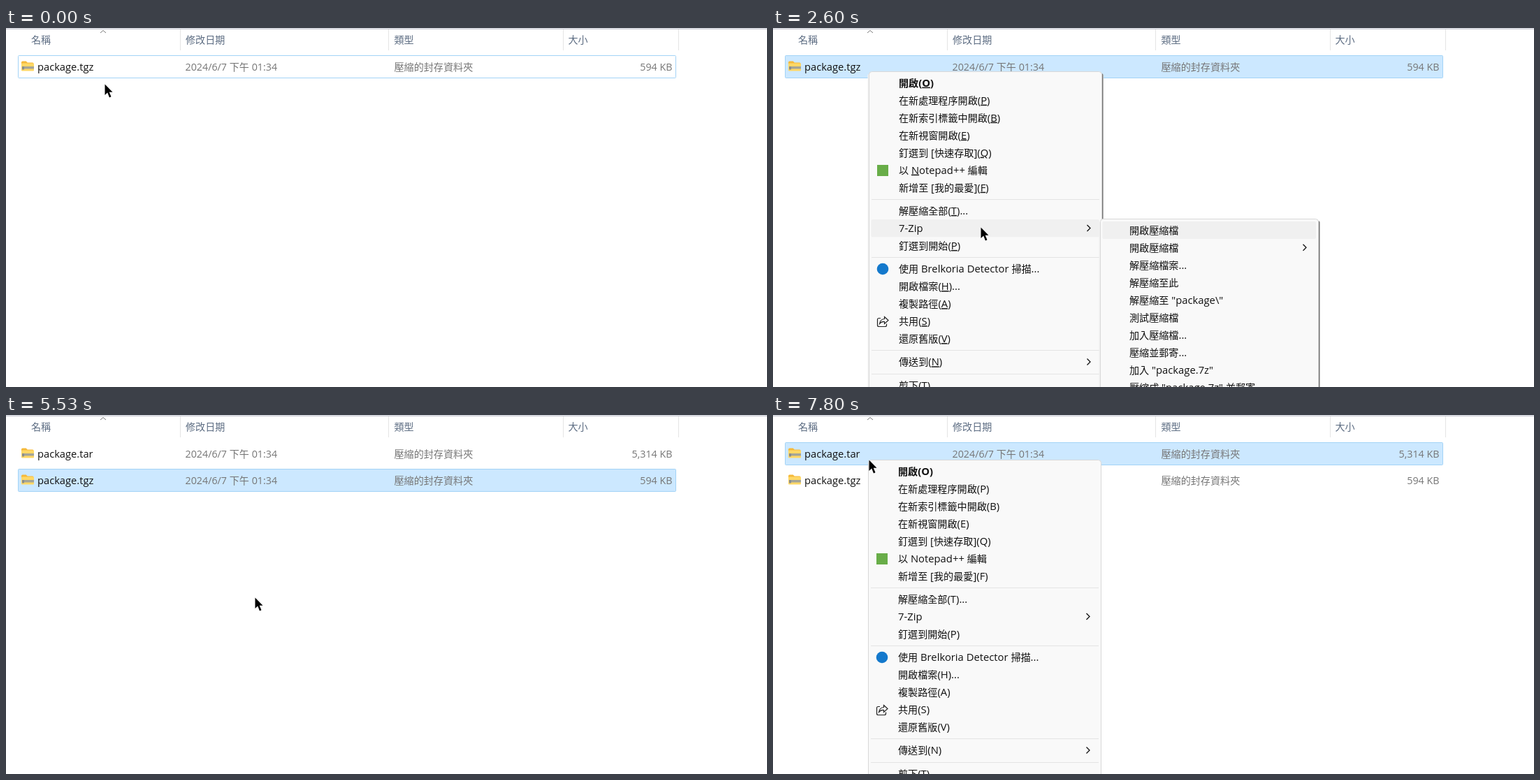
Recreate the animation shown at these times as an HTML page. Size 1089 by 514 pixels, loop 8000 ms.

```html
<!DOCTYPE html>
<html lang="zh-Hant">
<head>
<meta charset="utf-8">
<title>Archive extraction</title>
<style>
  html, body { margin: 0; width: 100%; height: 100%; overflow: hidden; background: #fff; }
  svg { display: block; width: 100vw; height: 100vh; }
  text { font-family: "Open Sans", "Noto Sans", sans-serif; }
  .cjk { font-family: "Noto Sans CJK TC", "Noto Sans CJK", sans-serif; font-size: 14.1px; }
  text:not([font-weight]) .cjk { font-weight: 350; }
  .keys .key { text-decoration: underline; }
</style>
</head>
<body>
<svg id="stage" viewBox="0 0 1089 514"></svg>
<script>
const LOOP = 8000;
const stage = document.getElementById('stage');

function add(parent, tag, attrs = {}) {
  const node = document.createElementNS('http://www.w3.org/2000/svg', tag);
  set(node, attrs);
  return parent.appendChild(node);
}
function set(node, attrs) {
  for (const name in attrs) node.setAttribute(name, attrs[name]);
}
const show = (node, visible) => set(node, { visibility: visible ? 'visible' : 'hidden' });
const box = (parent, x, y, width, height, fill, more = {}) =>
  add(parent, 'rect', { x, y, width, height, fill, ...more });
const line = (parent, d, stroke, width = 1) =>
  add(parent, 'path', { d, stroke, fill: 'none', 'stroke-width': width });

// Splits a label into CJK runs, other runs and _access keys.
function label(parent, string, x, y, attrs = {}) {
  const node = add(parent, 'text', { x, y, 'font-size': 14.8, fill: '#111', ...attrs });
  for (const run of string.match(/[\u3400-\u9fff]+|_.|[^\u3400-\u9fff_]+/g)) {
    const span = add(node, 'tspan');
    if (run[0] === '_') set(span, { class: 'key' });
    else if (/[\u3400-\u9fff]/.test(run)) set(span, { class: 'cjk' });
    span.textContent = run.replace('_', '');
  }
  return node;
}

// Column headers
box(stage, 0, 0, 1089, 514, '#fff');
box(stage, 0, 0.5, 1089, 1.5, '#c6c8d1');
for (const x of [249.5, 547.5, 797.5, 962.5]) line(stage, `M${x} 2V32`, '#e5e5e5');
line(stage, 'M135 7l4-3.5 4 3.5', '#777');
[['名稱', 36], ['修改日期', 257], ['類型', 555.5], ['大小', 804.5]]
  .forEach(([title, x]) => label(stage, title, x, 22, { fill: '#5d6d83' }));

// File list
const slots = [0, 38].map(dy => box(stage, 17.5, 39.5 + dy, 941, 32, '#fff', { rx: 1 }));

function fileRow(name, size) {
  const row = add(stage, 'g');
  add(row, 'path', { d: 'M22 60V49.2q0-1.7 1.7-1.7h5l2 2h7.3q1.5 0 1.5 1.5v4z', fill: '#f5b93a' });
  box(row, 22, 50.5, 18, 11, '#ffd866', { rx: 1.2 });
  box(row, 23, 55, 17, 3.5, '#a5a597');
  box(row, 23, 55, 3, 4.5, '#8b8e8c');
  const soft = { fill: '#767676', 'font-size': 14.3 };
  label(row, name, 45, 61, { 'font-size': 14.7 });
  label(row, '2024/6/7 下午 01:34', 256.5, 61, soft);
  label(row, '壓縮的封存資料夾', 555.5, 61, soft);
  label(row, size, 953.5, 61, { ...soft, 'text-anchor': 'end' });
  return row;
}
const tgz = fileRow('package.tgz', '594 KB');
const tar = fileRow('package.tar', '5,314 KB');

// Menus
function panel(x, y, width) {
  const group = add(stage, 'g');
  const shadow = add(group, 'g');
  box(shadow, x + width, y + 3, 1.5, 500, '#777');
  box(shadow, x + width + 1.5, y + 4, 1, 500, '#b4b4b4');
  box(shadow, x - 2, y + 4, 2, 500, '#f0f0f0');
  box(group, x, y, width, 520, '#f9f9f9', { rx: 4, stroke: '#d8d8d8' });
  const hover = box(group, x + 3, 0, width - 6.5, 25, '#f0f0f0', { rx: 2 });
  return { group, shadow, hover };
}
const chevron = (parent, x, y) => line(parent, `M${x - 2.5} ${y - 4.5}l4.5 4.5-4.5 4.5`, '#111', 1.3);

const menu = panel(137.5, 62.5, 333);
const sections = [
  ['開啟(_O)', '在新處理程序開啟(_P)', '在新索引標籤中開啟(_B)', '在新視窗開啟(_E)',
    '釘選到 [快速存取](_Q)', '以 _Notepad++ 編輯', '新增至 [我的最愛](_F)'],
  ['解壓縮全部(_T)...', '7-Zip', '釘選到開始(_P)'],
  ['使用 Brelkoria Detector 掃描...', '開啟檔案(_H)...', '複製路徑(_A)', '共用(_S)', '還原舊版(_V)'],
  ['傳送到(_N)'],
  ['剪下(_T)']
];
const centres = [];
let itemY = 78.5;
for (const items of sections) {
  for (const item of items) {
    label(menu.group, item, 180, itemY + 5.2, centres.length ? {} : { 'font-weight': 700 });
    centres.push(itemY);
    itemY += 25;
  }
  line(menu.group, `M141 ${Math.round(itemY - 8.5) + 0.5}H467`, '#e4e4e4');
  itemY += 8.2;
}
const ARCHIVER = 8;
chevron(menu.group, 452, 286.5);
chevron(menu.group, 452, 478);
box(menu.group, 149, 196, 16, 16, '#68ad48');
add(menu.group, 'circle', { cx: 157, cy: 345, r: 8.3, fill: '#1479cc' });
line(menu.group, 'M154 415.5h-2.5q-2 0-2 2v8q0 2 2 2h9q2 0 2-2v-2', '#222', 1.2);
line(menu.group, 'M159.5 413.5l5.5 5-5.5 5v-3q-4.5-.3-7 3 .8-6.5 7-7z', '#222', 1.2);

const submenu = panel(468.5, 273.5, 312);
['開啟壓縮檔', '開啟壓縮檔', '解壓縮檔案...', '解壓縮至此', '解壓縮至 "package\\"', '測試壓縮檔',
  '加入壓縮檔...', '壓縮並郵寄...', '加入 "package.7z"', '壓縮成 "package.7z" 並郵寄']
  .forEach((item, i) => label(submenu.group, item, 510, 294.6 + 25.05 * i));
chevron(submenu.group, 761, 314.2);

// The chosen item lingers and fades after the menus close.
const chosen = add(stage, 'g');
box(chosen, 470, 352, 308, 25.5, '#f0f0f0');
label(chosen, '解壓縮至此', 510, 369.8);

const pointer = add(stage, 'path', {
  d: 'M.5 .5V16L4.2 12.6 7 19.400 9.500 18.300 6.700 11.700H11.500Z',
  fill: '#000', stroke: '#fff', 'stroke-width': 1, 'paint-order': 'stroke'
});

// Pointer path: time, x, y
const path = [
  [0, 141, 80], [330, 137, 62],
  [1730, 137, 62], [1800, 161, 67], [1930, 215, 150], [2070, 289, 275], [2130, 297, 296],
  [2330, 297, 296], [2600, 297, 285],
  [2930, 297, 285], [3130, 330, 287], [3330, 425, 293], [3530, 522, 314], [3800, 573, 358],
  [3930, 574, 361], [4270, 574, 361], [4470, 520, 330], [4670, 403, 273], [4730, 372, 264], [4800, 356, 261],
  [5930, 356, 261], [6070, 325, 235], [6270, 210, 150], [6400, 163, 116], [6470, 159, 113], [6800, 137, 64],
  [LOOP, 137, 64]
];
function pointerAt(t) {
  const i = Math.max(1, path.findIndex(key => key[0] >= t));
  const [t0, x0, y0] = path[i - 1], [t1, x1, y1] = path[i];
  const k = (t - t0) / (t1 - t0);
  return [x0 + (x1 - x0) * k, y0 + (y1 - y0) * k];
}

function drawRows(t, y, menuOpen) {
  const sorted = t >= 5530;
  set(tgz, { transform: `translate(0 ${sorted ? 38 : 0})` });
  set(tar, { transform: `translate(0 ${sorted ? 0 : 38})` });
  show(tar, t >= 5000);

  const focused = sorted && t < 6870 ? 1 : 0;
  const selected = (t >= 530 && t < 6400) || t >= 6870 ? focused : -1;
  slots.forEach((slot, i) => {
    const top = 39 + 38 * i;
    const used = i === 0 || t >= 5000;
    const hovered = used && !menuOpen && y >= top && y < top + 33;
    set(slot, {
      fill: selected === i ? '#cce8ff' : hovered ? '#e5f3ff' : '#fff',
      stroke: focused === i ? '#a3d3f6' : 'none'
    });
  });
}

function drawMenus(t, x, y) {
  const first = t >= 1330 && t < 4070;
  const second = t >= 7730;
  const settled = first && t >= 1400;
  const subOpen = t >= 2400 && t < 4070;

  show(menu.group, first || second);
  set(menu.group, {
    class: settled ? 'keys' : '',
    transform: second ? 'translate(-1 2)' : '',
    opacity: second && t < 7800 ? 0.6 : 1
  });
  set(menu.shadow, { opacity: settled ? 1 : 0 });
  const item = subOpen ? ARCHIVER : centres.findIndex(c => Math.abs(c - y) <= 12.5);
  const hot = settled && t >= 1800 && item >= 0;
  set(menu.hover, { y: hot ? centres[item] - 12.5 : 0, opacity: hot ? 1 : 0 });

  show(submenu.group, subOpen);
  set(submenu.group, { opacity: t < 2470 ? 0.6 : 1 });
  const row = x > 470 ? Math.max(0, Math.floor((y - 277) / 25.05)) : 0;
  set(submenu.hover, { y: 277 + 25.05 * row });

  show(chosen, t >= 4070 && t < 4270);
  set(chosen, { opacity: t < 4130 ? 0.75 : t < 4200 ? 0.5 : 0.25 });
  return first || second;
}

function render(time) {
  const step = Math.floor((time % LOOP + 3.4) * 15 / 1000) % 120;
  const t = Math.round(step * 100 / 15) * 10;
  const [x, y] = pointerAt(t);
  drawRows(t, y, drawMenus(t, x, y));
  set(pointer, { transform: `translate(${Math.round(x)} ${Math.round(y)})` });
}

const start = performance.now();
function tick() {
  render(performance.now() - start);
  requestAnimationFrame(tick);
}
tick();
</script>
</body>
</html>
```
